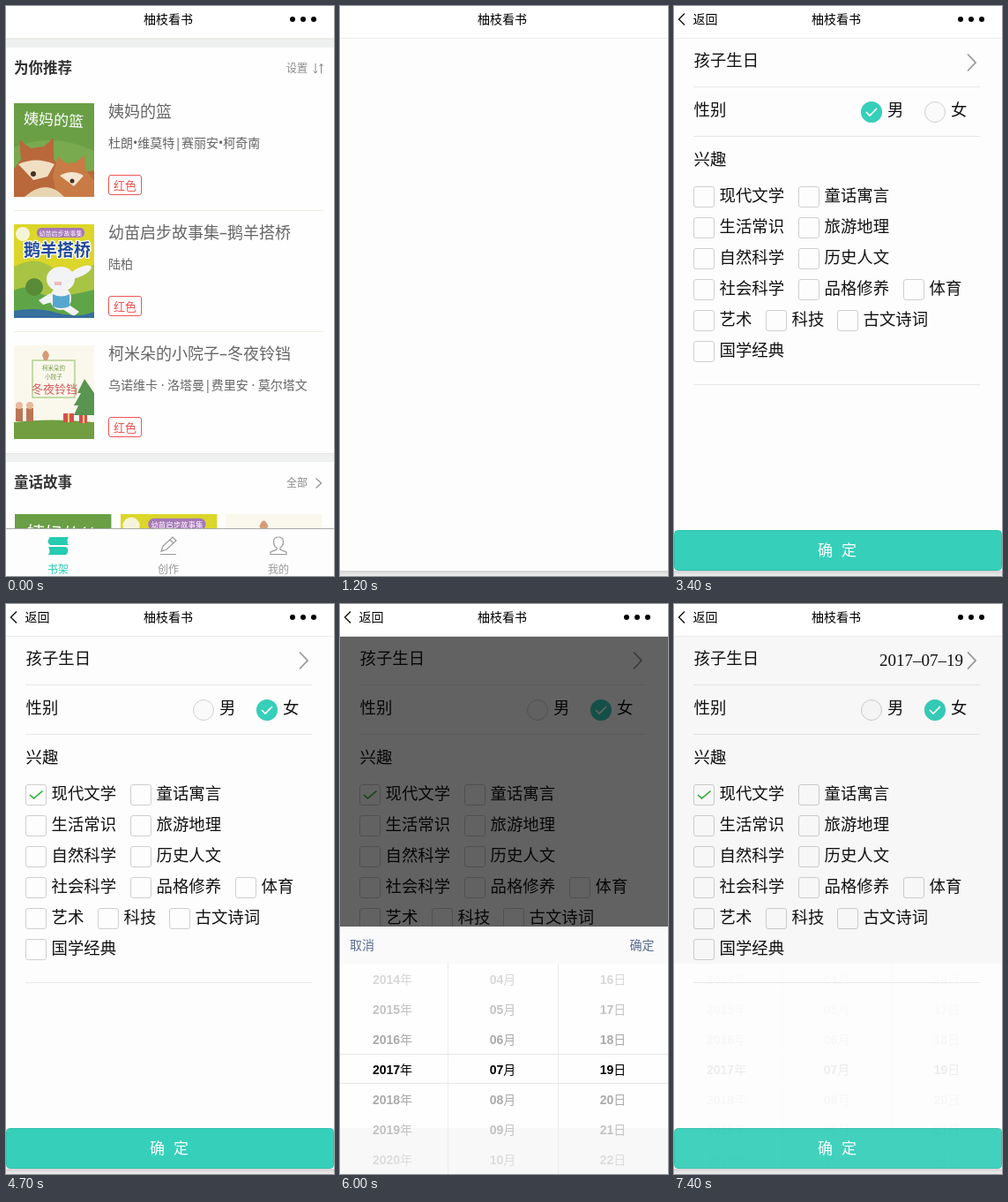
Recreate the animation shown at these times as an HTML page. Size 372 by 645 pixels, loop 8000 ms.

```html
<!DOCTYPE html>
<html lang="zh-CN">
<head>
<meta charset="utf-8">
<title>柚枝看书</title>
<style>
html, body { margin: 0; width: 100%; height: 100%; overflow: hidden; background: #fff; }
svg { display: block; width: 100%; height: 100%; }
text { font-family: "Noto Sans", "Noto Sans CJK SC", "Noto Sans CJK", sans-serif; white-space: pre; }
.serif { font-family: "Liberation Serif", serif; }
.digits { font-family: "Liberation Sans", sans-serif; font-weight: bold; }
.line { fill: none; stroke-width: 1; }
.step { animation: 8s step-end infinite; }
#list { animation-name: list; }
#tap { animation-name: tap; }
#dots { animation-name: dots; }
#back { animation-name: back; }
#progress { animation-name: progress; }
#form { animation-name: form; }
#male { animation-name: male; }
#female { animation-name: female; }
#tick { animation-name: tick; }
#dim { animation-name: dim; }
#actions { animation-name: actions; }
#picker { animation-name: picker; }
#date { animation-name: date; }
@keyframes list { 0% { opacity: 1 } 15%, 100% { opacity: 0 } }
@keyframes tap { 0% { opacity: 0 } 8.75% { opacity: 1 } 15%, 100% { opacity: 0 } }
@keyframes dots { 0% { opacity: 1 } 15% { opacity: 0 } 16.25% { opacity: .5 } 17.5%, 100% { opacity: 1 } }
@keyframes back { 0% { opacity: 0 } 16.25% { opacity: .5 } 17.5%, 100% { opacity: 1 } }
@keyframes progress { 0% { opacity: 0 } 20% { opacity: 1 } 22.5%, 100% { opacity: 0 } }
@keyframes form { 0% { opacity: 0 } 22.5% { opacity: .35 } 23.75% { opacity: .75 } 25%, 100% { opacity: 1 } }
@keyframes male { 0% { opacity: 0 } 42.5% { opacity: 1 } 47.5%, 100% { opacity: 0 } }
@keyframes female { 0% { opacity: 0 } 47.5%, 100% { opacity: 1 } }
@keyframes tick { 0% { opacity: 0 } 58.75%, 100% { opacity: 1 } }
@keyframes dim {
  0% { opacity: 0 } 72.5% { opacity: .34 } 73.75% { opacity: .5 } 75% { opacity: .61 }
  91.25% { opacity: .3 } 92.5%, 100% { opacity: .022 }
}
@keyframes actions { 0% { opacity: 0 } 72.5% { opacity: 1 } 91.25% { opacity: .5 } 92.5%, 100% { opacity: 0 } }
@keyframes picker { 0% { opacity: 0 } 72.5% { opacity: 1 } 91.25% { opacity: .5 } 92.5%, 100% { opacity: .06 } }
@keyframes date { 0% { opacity: 0 } 91.25%, 100% { opacity: 1 } }
</style>
</head>
<body>
<svg viewBox="0 0 372 645">
  <defs>
    <linearGradient id="shade" x2="0" y2="1">
      <stop stop-color="#d2d2d2"/><stop offset="1" stop-color="#eee"/>
    </linearGradient>
    <clipPath id="edge"><path d="M0 0h91v106H0z"/></clipPath>

    <g id="cover0" clip-path="url(#edge)">
      <path fill="#6a9f45" d="M0 0h91v106H0z"/>
      <path fill="#79aa50" d="M0 50q45-18 91 4v52H0z"/>
      <text x="11" y="25" font-size="17" fill="#fff" transform="rotate(3 45 20)">姨妈的篮</text>
      <path fill="#b9683c" d="M0 106V74L8 64 6 41 19 51 34 49 45 39 45 63 58 82 91 76v30z"/>
      <path fill="#f1dfc4" d="M5 69q20-9 41 0l-8 14-16 4z"/>
      <path fill="#c97b45" d="M44 82L50 60 59 68 70 67 80 59 81 75 91 88v18H49z"/>
      <path fill="#f4e6d0" d="M52 82q14-8 27 0l-11 12z"/>
      <circle cx="22" cy="80" r="3" fill="#46301f"/><circle cx="66" cy="88" r="2.5" fill="#46301f"/>
      <path fill="#e8d5b2" d="M12 106q25-22 45 0z"/>
    </g>

    <g id="cover1" clip-path="url(#edge)">
      <path fill="#dbd629" d="M0 0h91v106H0z"/>
      <path fill="#a9c444" d="M0 48q25-14 45 2t46-5v61H0z"/>
      <rect x="26" y="4" width="54" height="11" rx="5" fill="#a678b8"/>
      <text x="53" y="12.5" font-size="7" fill="#fff" text-anchor="middle">幼苗启步故事集</text>
      <circle cx="10" cy="11" r="8" fill="#f6f4d8"/>
      <text x="49" y="36" font-size="19" font-weight="bold" fill="#214b9c" stroke="#fff" stroke-width="2.5" paint-order="stroke" text-anchor="middle">鹅羊搭桥</text>
      <path fill="#5fa548" d="M0 75q15-8 28 2t63-3v32H0z"/>
      <g fill="#f2f3f5">
        <ellipse cx="53" cy="62" rx="16" ry="14"/>
        <ellipse cx="75" cy="54" rx="14" ry="5" transform="rotate(-25 75 54)"/>
        <ellipse cx="53" cy="84" rx="12" ry="13"/>
        <path d="M41 78L28 86l5 5 14-4zM61 90l13 9-6 5-13-8z"/>
      </g>
      <path fill="#f0b9bd" d="M46 65h8v4h-8z"/>
      <path fill="#56a7cf" d="M44 79q10 5 19 0v14q-10 4-19 0z"/>
      <circle cx="23" cy="71" r="10" fill="#598b37"/>
      <path fill="#376f9f" d="M0 98q25-5 48 2t43-1v7H0z"/>
    </g>

    <g id="cover2" clip-path="url(#edge)">
      <path fill="#faf8ec" d="M0 0h91v106H0z"/>
      <path fill="#719e40" d="M0 87q40-5 91 0v19H0z"/>
      <path fill="none" stroke="#b2cf91" stroke-width="1.5" d="M21 17h48v42H21z"/>
      <path fill="#d89b78" d="M32 11q4-10 8 0l-2 6h-4z"/>
      <text x="45" y="28" font-size="6.5" fill="#739946" text-anchor="middle">柯米朵的</text>
      <text x="45" y="38" font-size="6.5" fill="#739946" text-anchor="middle">小院子</text>
      <text x="46" y="54" font-size="13" fill="#d9585c" text-anchor="middle">冬夜铃铛</text>
      <path fill="#599451" d="M80 38L72 54h4L68 68h5l-5 11h23V54z"/>
      <path fill="#bb7455" d="M2 71h8v15H2zM14 71h8v15h-8z"/>
      <circle cx="6" cy="68" r="4" fill="#e9b99b"/><circle cx="18" cy="68" r="4" fill="#e9b99b"/>
      <path fill="#d64e51" d="M56 77h12v10H56zM74 79h9v9h-9z"/>
      <path stroke="#f4d673" stroke-width="2" d="M62 77v10M79 79v9"/>
    </g>
  </defs>

  <path fill="#fdfdfd" d="M0 0h372v645H0z"/>
  <path fill="url(#shade)" d="M0 639h372v6H0z"/>
  <path id="progress" class="step" fill="#36cfba" d="M0 36h27v2H0z"/>
  <g id="form" class="step"></g>
  <path id="dim" class="step" d="M0 36h372v371H0z"/>
  <g id="actions" class="step"></g>
  <g id="picker" class="step"></g>
  <g id="list" class="step"></g>

  <g id="header">
    <path fill="#fff" d="M0 0h372v36H0z"/>
    <path class="line" stroke="#ededed" d="M0 36.5h372"/>
    <text x="184" y="20" font-size="14" text-anchor="middle">柚枝看书</text>
    <g id="dots" class="step">
      <circle cx="325" cy="15" r="3"/><circle cx="337" cy="15" r="3"/><circle cx="349" cy="15" r="3"/>
    </g>
    <g id="back" class="step">
      <path fill="none" stroke="#111" stroke-width="1.4" d="M12 8.5L5.5 15l6.500 6.500"/>
      <text x="21.5" y="20" font-size="14">返回</text>
    </g>
  </g>
</svg>
<script>
const fill = (id, parts) => { document.getElementById(id).innerHTML = parts.flat(3).join(''); };
const text = (x, y, size, color, str, extra = '') =>
  `<text x="${x}" y="${y}" font-size="${size}" fill="${color}" ${extra}>${str}</text>`;
const line = (d, color, width = 1) =>
  `<path class="line" d="${d}" stroke="${color}" style="stroke-width:${width}"/>`;
const box = (x, y, w, h, color, extra = '') =>
  `<rect x="${x}" y="${y}" width="${w}" height="${h}" fill="${color}" ${extra}/>`;
const middle = 'text-anchor="middle"';

// Book list
const books = [
  ['姨妈的篮', '杜朗•维莫特|赛丽安•柯奇南'],
  ['幼苗启步故事集–鹅羊搭桥', '陆柏'],
  ['柯米朵的小院子–冬夜铃铛', '乌诺维卡 · 洛塔曼|费里安 · 莫尔塔文']
];
const bookRow = ([title, authors], i) => {
  const y = 110 + 137 * i;
  return [
    `<use href="#cover${i}" x="9" y="${y}"/>`,
    text(116, y + 16, 18, '#666', title),
    text(116, y + 50, 14, '#666', authors),
    box(116.5, y + 81.5, 37, 22, 'none', 'rx="2.5" stroke="#ee5555"'),
    text(122, y + 97.5, 13, '#ee5050', '红色'),
    i < 2 ? line(`M9 ${y + 121.5}h351`, '#efefe2') : ''
  ];
};
const band = y => box(0, y, 372, 9, '#eff0f0') + line(`M0 ${y - .5}h372`, '#e9e9e2');
const tab = (x, label, color) => text(x, 641.5, 12, color, label, middle);

fill('list', [
  box(0, 0, 372, 645, '#fefefe'),
  band(38), band(507),
  `<g id="tap" class="step">${box(318, 46, 42, 32, '#e6e6e6')}</g>`,
  text(9, 76, 16.5, '#333', '为你推荐', 'font-weight="bold"'),
  text(318, 75, 12, '#888', '设置'),
  line('M351 65v11m-2-2.500l2 2.500 2-2.500M357.500 76.500v-11m-2 2.500l2-2.500 2 2.500', '#888'),
  books.map(bookRow),
  text(9, 545, 16.5, '#333', '童话故事', 'font-weight="bold"'),
  text(318, 544, 12, '#888', '全部'),
  line('M351.5 534.5l6 5.5-6 5.5', '#999', 1.4),
  [10, 130, 249].map((x, i) =>
    `<use href="#cover${i}" transform="translate(${x} 575) scale(1.205)"/>`),
  box(0, 591, 372, 54, '#fdfdfd'),
  line('M0 591.5h372', '#aaa'),
  '<path fill="#26cbb0" d="M50 601h21q-3 4 0 9H50q-5-4 0-9zM48 612h20q5 4 0 9H48q3-4 0-9z"/>',
  line('M176 617l2-6 11-10 4 4-11 10zM186 604l4 4M175 620.5h18', '#999', 1.2),
  line('M309 601c-8 0-6 10-2 12v2l-7 3v2.5h18v-2.5l-7-3v-2c4-2 6-12-2-12z', '#999', 1.2),
  tab(59, '书架', '#26cbb0'), tab(184, '创作', '#999'), tab(309, '我的', '#999')
]);

// Profile form
const label = (x, y, str) => text(x, y, 18.4, '#111', str, 'font-weight="300"');
const interests = [
  ['现代文学', '童话寓言'], ['生活常识', '旅游地理'], ['自然科学', '历史人文'],
  ['社会科学', '品格修养', '体育'], ['艺术', '科技', '古文诗词'], ['国学经典']
];
const interestRow = (names, row) => {
  let x = 22;
  const y = 204 + 35 * row;
  return names.map(name => {
    const left = Math.round(x);
    x += 44.2 + 18.7 * name.length;
    return box(left + .5, y + .5, 23, 23, '#fdfdfd', 'rx="2.5" stroke="#cfcfcf"') + label(left + 29.5, y + 16.5, name);
  });
};
const radio = (x, name, id) => [
  `<circle cx="${x}" cy="120" r="11.5" fill="#fafafa" stroke="#cfcfcf"/>`,
  `<g id="${id}" class="step"><circle cx="${x}" cy="120" r="12" fill="#36cfba"/>`,
  line(`M${x - 6} 120l4 4 8-8`, '#fff', 1.7), '</g>',
  label(x + 18, 124, name)
];

fill('form', [
  label(22.5, 68, '孩子生日'),
  `<g id="date" class="step">${text(328, 70, 19, '#111', '2017–07–19', 'class="serif" text-anchor="end"')}</g>`,
  line('M333 54.5l9 9.5-9 9.5', '#999', 1.8),
  label(22.5, 124, '性别'),
  radio(224, '男', 'male'), radio(296, '女', 'female'),
  label(22.5, 180, '兴趣'),
  [91.5, 147.5, 428.5].map(y => line(`M22 ${y}h325`, '#e8e8e8')),
  interests.map(interestRow),
  `<g id="tick" class="step">${line('M27 216l4.5 4 10-8.5', '#28ad28', 1.6)}</g>`,
  box(.5, 593.5, 371, 45, '#36cfba', 'rx="4" stroke="#31c0ac"'),
  text(171.5, 622, 17, '#fff', '确', middle), text(198.5, 622, 17, '#fff', '定', middle)
]);

// Date picker: seven rows around the chosen one
const shades = ['#d8d8d8', '#c2c2c2', '#aaa', '#000', '#aaa', '#c2c2c2', '#dcdcdc'];
const column = ([x, chosen, unit]) => shades.map((color, i) => {
  const value = String(chosen + i - 3).padStart(2, '0');
  return text(x, 430 + 34 * i, 14, color, `<tspan class="digits">${value}</tspan>${unit}`, middle);
});

fill('actions', [
  box(0, 365, 372, 42, '#fafafa'),
  text(11, 391, 14, '#586c94', '取消'), text(328.5, 391, 14, '#586c94', '确定')
]);
fill('picker', [
  box(0, 407, 372, 238, '#fefefe'),
  box(0, 593, 372, 52, '#f8f8f8'),
  line('M122.5 407v238M247.5 407v238', '#ececec'),
  line('M0 509.5h372M0 542.5h372', '#e6e6e6'),
  [[59.5, 2017, '年'], [184.5, 7, '月'], [309.5, 19, '日']].map(column)
]);
</script>
</body>
</html>
```
